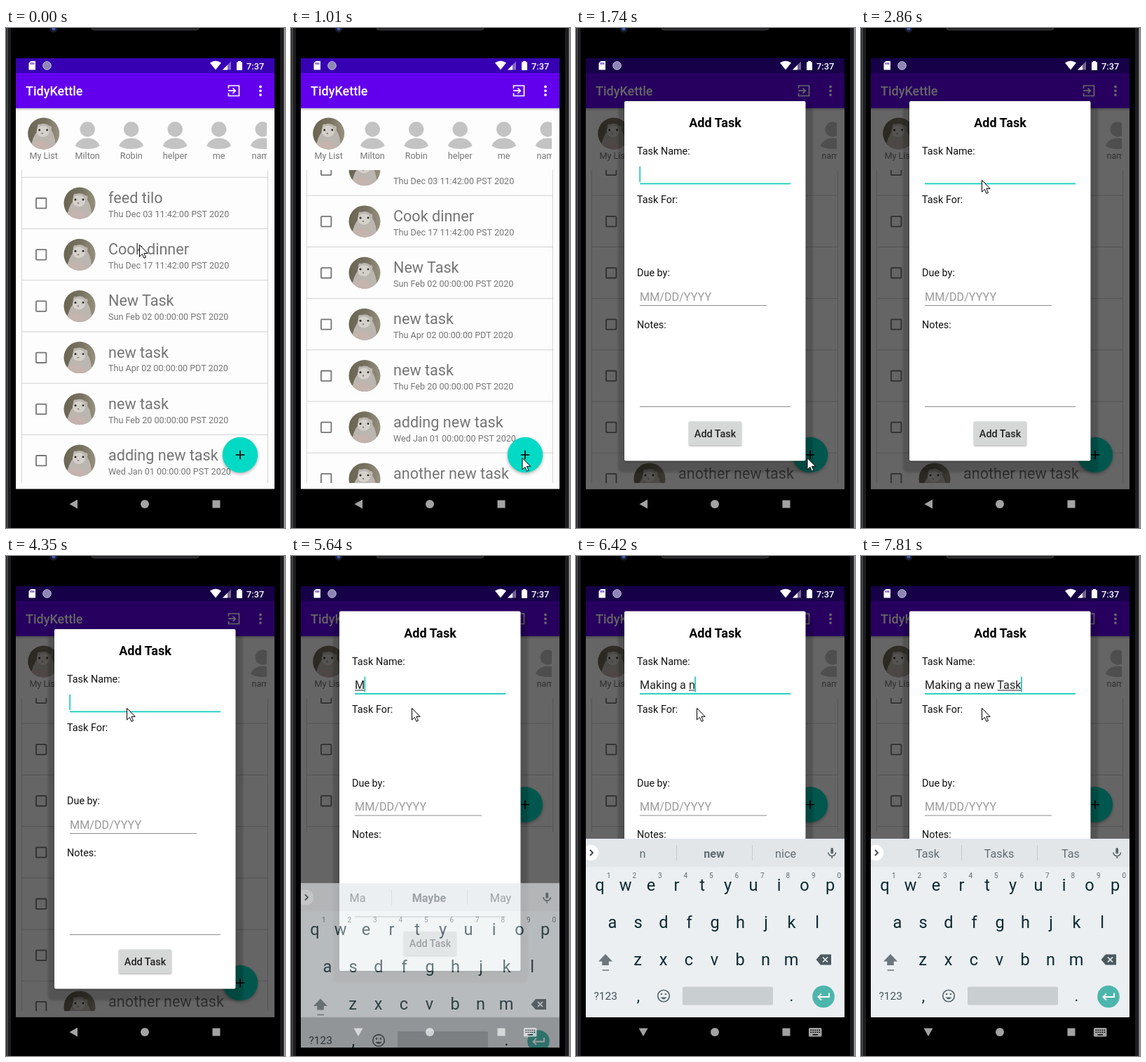
An HTML page that plays this animation: 398x711 px, repeating every 8 s.

```html
<!DOCTYPE html>
<html lang="en">
<head>
<meta charset="utf-8">
<title>Add a task</title>
<style>
  html, body { margin: 0; width: 100%; height: 100%; overflow: hidden; background: #000; }
  svg { display: block; font-family: Roboto, sans-serif; }
  text { white-space: pre; }
  .mid { text-anchor: middle; }
  .medium { font-weight: 500; }
  .bold { font-weight: 700; }
  .shade { filter: blur(1.5px); }
  .fab { filter: drop-shadow(0 2px 2px rgba(0,0,0,.3)); }
  .raised { filter: drop-shadow(0 1px 1px rgba(0,0,0,.35)); }
</style>
</head>
<body>
<svg id="stage" width="398" height="711" viewBox="0 0 398 711">
  <defs>
    <clipPath id="screenClip"><rect x="14" y="43" width="369" height="656"/></clipPath>
    <clipPath id="listClip"><rect id="listArea" x="22" y="202" width="352" height="445"/></clipPath>
    <clipPath id="friendClip"><rect x="23" y="118" width="349" height="84"/></clipPath>
    <clipPath id="round"><circle r="22.5"/></clipPath>
    <linearGradient id="bar" x1="0" y1="0" x2="0" y2="1">
      <stop offset="0" stop-color="#000" stop-opacity=".24"/>
      <stop offset="1" stop-color="#000" stop-opacity="0"/>
    </linearGradient>
    <linearGradient id="wall">
      <stop offset="0" stop-color="#6a6453"/>
      <stop offset=".55" stop-color="#77715f"/>
      <stop offset="1" stop-color="#989280"/>
    </linearGradient>
    <g id="pet" clip-path="url(#round)">
      <rect x="-23" y="-23" width="46" height="46" fill="url(#wall)"/>
      <path d="M-19 23Q-16 4-9-3Q-10-16-5-13Q2-16 8-11Q13-11 11-5Q18 6 17 23Z" fill="#bbb6af"/>
      <ellipse cx="-1" cy="-3" rx="9" ry="8" fill="#d4d1cb"/>
      <path d="M-19 23Q-15 9-4 10Q8 11 10 23Z" fill="#c5b3ae"/>
      <circle cx="-6" cy="-5" r="1.5" fill="#292522"/>
      <circle cx="5" cy="-5" r="1.4" fill="#292522"/>
      <circle cx="-2" cy="0" r="1.2" fill="#96827b"/>
    </g>
    <g id="person" fill="#c3c3c3">
      <circle cy="-6" r="10.7"/>
      <path d="M-17.5 17.5Q-13 6.5 0 6.5Q13 6.5 17.5 17.5Q11 22 0 22Q-11 22-17.5 17.5Z"/>
    </g>
  </defs>

  <!-- phone body -->
  <rect width="398" height="711" fill="#000"/>
  <rect width="7" height="711" fill="#1d1d1f"/>
  <rect x="1" width="1.5" height="711" fill="#55565a"/>
  <rect x="391" width="7" height="711" fill="#1d1d1f"/>
  <rect x="396.5" width="1.5" height="711" fill="#a5a5a8"/>
  <rect x="122" y="-5" width="153" height="8" rx="4" fill="#242426" stroke="#3c3c3e"/>
  <circle cx="68" cy="1" r="5.5" fill="#161a2a"/>
  <circle cx="68" cy="1" r="2.5" fill="#3c59a8"/>

  <!-- app -->
  <rect x="14" y="43" width="369" height="612.5" fill="#fdfdfd"/>
  <g id="friends" clip-path="url(#friendClip)" font-size="12.6" fill="#757575"></g>
  <g clip-path="url(#listClip)">
    <path d="M22.5 200V650M373.5 200V650" stroke="#d5d5d5"/>
    <g id="rows" fill="#757575"></g>
  </g>
  <rect x="14" y="114" width="369" height="4" fill="url(#bar)"/>
  <rect x="14" y="43" width="369" height="21" fill="#3700b3"/>
  <rect x="14" y="64" width="369" height="50" fill="#6200ee"/>
  <text class="medium" x="28" y="96" font-size="18" fill="#fff">TidyKettle</text>
  <path d="M317.5 86V82H332.5V96.5H317.5V92.5M317 89.2H327M323.5 85.5L327.3 89.2L323.5 93" fill="none" stroke="#fff" stroke-width="1.7"/>
  <g fill="#fff"><circle cx="363" cy="83.5" r="1.9"/><circle cx="363" cy="89.3" r="1.9"/><circle cx="363" cy="95.1" r="1.9"/></g>
  <g id="fab">
    <circle class="fab" cx="334" cy="607" r="25.2" fill="#03dac5"/>
    <path d="M327.7 607H340.3M334 600.7V613.3" stroke="#000" stroke-width="1.7"/>
  </g>
  <rect id="dim" x="14" y="43" width="369" height="612.5" opacity="0"/>

  <!-- dialog -->
  <g id="dialog">
    <rect class="shade" x="60" y="112" width="278" height="520" rx="6" opacity=".17"/>
    <rect class="raised" x="69" y="104" width="258.5" height="511.5" rx="2" fill="#fff"/>
    <text class="mid bold" x="198.5" y="141" font-size="18">Add Task</text>
    <g font-size="14.4" fill="#111">
      <text x="87" y="180">Task Name:</text>
      <text x="87" y="248.5">Task For:</text>
      <text x="87" y="353">Due by:</text>
      <text x="87" y="426.5">Notes:</text>
    </g>
    <text id="typed" x="91" y="214.5" font-size="16.2" fill="#222"></text>
    <rect id="wordLine" y="216" height="1" fill="#222"/>
    <rect id="caret" y="197" width="1.8" height="22" fill="#2bc9b9"/>
    <rect x="91" y="220.5" width="215" height="1.8" fill="#14cdbb"/>
    <text x="91" y="387.5" font-size="16.2" fill="#9a9a9a">MM/DD/YYYY</text>
    <path d="M91 394.5H272M91 538.5H306" stroke="#8c8c8c"/>
    <rect class="raised" x="161" y="559.5" width="75" height="34" rx="1.5" fill="#d6d7d7"/>
    <text class="mid medium" x="198.5" y="581.5" font-size="14.4" fill="#222">Add Task</text>
  </g>

  <!-- status icons -->
  <g fill="#fff">
    <path d="M35.5 47H42V59.5H32.5V50Z"/>
    <path d="M35.5 49V52M37.6 49V52M39.7 49V52" stroke="#3700b3"/>
    <circle cx="58.5" cy="53.5" r="5.8" fill="#8d86b5" stroke="#c9c5dc"/>
    <path d="M54 51A6 6 0 0 0 62 58A6 6 0 0 1 54 51Z" fill="#c9c5dc"/>
    <path d="M291 49.5Q299 44 307 49.5L299 59.5Z"/>
    <path d="M309 59.5L321 47.5V59.5Z" opacity=".4"/>
    <path d="M309 59.5L316 52.5V59.5Z"/>
    <path d="M329 48.5H331V47H335V48.5H337V60H329Z"/>
    <text class="medium" x="343" y="58.5" font-size="12.8">7:37</text>
  </g>

  <!-- keyboard -->
  <g clip-path="url(#screenClip)">
    <g id="keyboard">
      <rect x="14" y="402" width="369" height="254" fill="#ebeff2"/>
      <rect x="14" y="402" width="369" height="40" fill="#e2e6e9"/>
      <circle cx="21" cy="422" r="11.2" fill="#fff"/>
      <path d="M20 418L24 422L20 426" fill="none" stroke="#37474f" stroke-width="1.8"/>
      <path d="M143.5 411V433M251.5 411V433" stroke="#c5cbcf"/>
      <g id="hints" font-size="16.2" fill="#616c72"></g>
      <g fill="none" stroke="#59666c" stroke-width="1.6">
        <path d="M360 421.5A5.2 5.2 0 0 0 370.4 421.5M365.2 426.5V430"/>
        <rect x="363.3" y="415" width="3.8" height="8.5" rx="1.9" fill="#59666c" stroke="none"/>
      </g>
      <g id="keys" font-size="23.6" fill="#0c2a32"></g>
      <path id="shift" d="M42 566L52 576.5H46.8V582H37.2V576.5H32Z" fill="#6b777d"/>
      <path d="M37.5 589H47" stroke="#6b777d" stroke-width="1.5"/>
      <path d="M349 566.5H364V581.5H349L342.5 574Z" fill="#4b5960"/>
      <path d="M352 570.5L359 577.5M359 570.5L352 577.5" stroke="#ebeff2" stroke-width="1.7"/>
      <text x="25.5" y="631" font-size="15.5" fill="#45545b">?123</text>
      <text class="mid" x="89" y="633" font-size="22" fill="#0c2a32">,</text>
      <text class="mid" x="307.5" y="633" font-size="22" fill="#0c2a32">.</text>
      <g fill="none" stroke="#55636a" stroke-width="1.6">
        <circle cx="125" cy="625.5" r="8.3"/><path d="M120.5 627.5Q125 633 129.5 627.5Z" fill="#55636a" stroke="none"/>
        <path d="M121 623H123.2M126.8 623H129" stroke-width="2.2"/>
      </g>
      <rect x="152" y="612.5" width="129" height="26" rx="2" fill="#c9ced1"/>
      <circle cx="353" cy="626.5" r="15.8" fill="#4db6ac"/>
      <path d="M361 621.5V627H346M350 622.5L345.5 627L350 631.5" fill="none" stroke="#fff" stroke-width="1.9"/>
    </g>
  </g>

  <!-- navigation bar -->
  <g fill="#fff" opacity=".64">
    <path id="back"/>
    <circle cx="198" cy="677" r="6"/>
    <rect x="294.5" y="671.5" width="11" height="11"/>
    <g id="imeIcon">
      <rect x="332" y="671" width="18.5" height="12.5" rx="1.5"/>
      <path d="M334.5 674.3H348.5M334.5 677.2H348.5" stroke="#000" stroke-width="1.5" stroke-dasharray="1.7 1.3"/>
      <path d="M337.5 680.7H345" stroke="#000" stroke-width="1.5"/>
    </g>
  </g>
  <path id="pointer" d="M0 0V16.5L3.9 12.9L6.5 18.7L9 17.6L6.4 11.9H11.7Z" fill="#fff" stroke="#000"/>
</svg>
<script>
const LOOP = 8000;
const $ = id => document.getElementById(id);
const label = (x, y, str, extra = '') => `<text x="${x}" y="${y}" ${extra}>${str}</text>`;

const friends = ['My List', 'Milton', 'Robin', 'helper', 'me', 'name'];
$('friends').innerHTML = friends.map((name, i) => {
  const x = 53.7 + i * 62.5;
  return `<use href="#${i ? 'person' : 'pet'}" x="${x}" y="150"/>` + label(x, 186, name, 'class="mid"');
}).join('');

const tasks = [
  ['feed tilo', 'Thu Dec 03 11:42:00 PST 2020'],
  ['Cook dinner', 'Thu Dec 17 11:42:00 PST 2020'],
  ['New Task', 'Sun Feb 02 00:00:00 PST 2020'],
  ['new task', 'Thu Apr 02 00:00:00 PDT 2020'],
  ['new task', 'Thu Feb 20 00:00:00 PST 2020'],
  ['adding new task', 'Wed Jan 01 00:00:00 PST 2020'],
  ['another new task', 'Wed Jan 01 00:00:00 PST 2020']
];
$('rows').innerHTML = tasks.map(([name, due], i) => `
  <g transform="translate(0 ${212.5 + i * 73.2})">
    <path d="M22 0H374" stroke="#d2d2d2"/>
    <rect x="43" y="29.7" width="14.4" height="14.4" rx="1" fill="none" stroke="#757575" stroke-width="1.8"/>
    <use href="#pet" x="105" y="36.7"/>
    ${label(146, 36.7, name, 'font-size="21.6"')}
    ${label(146, 56.5, due, 'font-size="12.6"')}
  </g>`).join('');

const keyRows = [['qwertyuiop', 34, 476], ['asdfghjkl', 52, 528.5], ['zxcvbnm', 88, 581.5]];
$('keys').innerHTML = keyRows.map(([letters, x, y], row) => [...letters].map((ch, i) => {
  const cx = x + i * 36.5;
  const digit = row ? '' : label(cx + 12.8, 458, (i + 1) % 10, 'class="mid" font-size="10" fill="#5d6a70"');
  return label(cx, y, ch, 'class="mid key"') + digit;
}).join('')).join('');
const keys = [...document.querySelectorAll('.key')];
const letters = keys.map(k => k.textContent);

$('hints').innerHTML = [95, 197, 299].map(x => label(x, 428.5, '', 'class="mid"')).join('');
const hints = [...$('hints').children];

// time, text, start of the underlined word (-1: none), suggestions, bold suggestion
const typing = [
  [0, '', -1, ['', '', ''], -1],
  [5590, 'M', 0, ['Ma', 'Maybe', 'May'], 1],
  [5700, 'Ma', 0, ['Ma', 'May', 'Maybe'], 1],
  [5780, 'Mak', 0, ['Mak', 'Make', 'Making'], 1],
  [5860, 'Maki', 0, ['Maki', 'Making', 'Makin'], 1],
  [5940, 'Makin', 0, ['Makin', 'Making', 'Makings'], 1],
  [6020, 'Making', 0, ['Making', 'Makings', 'Makin'], -1],
  [6090, 'Making ', -1, ['a', 'the', 'it'], -1],
  [6170, 'Making a', 7, ['a', 'an', 'all'], -1],
  [6240, 'Making a ', -1, ['new', 'good', 'few'], -1],
  [6420, 'Making a n', 9, ['n', 'new', 'nice'], 1],
  [6480, 'Making a ne', 9, ['ne', 'new', 'need'], 1],
  [6660, 'Making a new', 9, ['new', 'news', 'newer'], -1],
  [6780, 'Making a new ', -1, ['one', 'account', 'year'], -1],
  [7170, 'Making a new T', 13, ['T', 'The', 'To'], 1],
  [7260, 'Making a new Ta', 13, ['Ta', 'Take', 'Talk'], 1],
  [7440, 'Making a new Tas', 13, ['Tas', 'Task', 'Taste'], 1],
  [7810, 'Making a new Task', 13, ['Task', 'Tasks', 'Tas'], -1]
];

const pen = document.createElement('canvas').getContext('2d');
const widthOf = str => { pen.font = '16.2px Roboto, sans-serif'; return pen.measureText(str).width; };

const linear = u => u;
const smooth = u => u * u * (3 - 2 * u);
const settle = u => 1 - (1 - u) ** 2;
function track(t, stops, ease = linear) {
  const next = stops.findIndex(s => s[0] > t);
  if (next === 0) return stops[0][1];
  if (next < 0) return stops[stops.length - 1][1];
  const [t0, a] = stops[next - 1], [t1, b] = stops[next];
  return a + (b - a) * ease((t - t0) / (t1 - t0));
}
const show = (id, on) => $(id).setAttribute('visibility', on ? 'visible' : 'hidden');
const move = (id, x, y) => $(id).setAttribute('transform', `translate(${x} ${y})`);

// the list coasts to rest while the pointer heads for the round button
const scroll = [[0, 0], [520, -47.5]];
const pointerX = [[120, 190.5], [760, 323], [870, 323], [1010, 330], [2180, 330], [2810, 172.5]];
const pointerY = [[120, 308.5], [760, 611.5], [2180, 611.5], [2810, 216.5]];
const popUp = [[1480, 0], [1740, 1]];
const slide = [[5570, 150], [5640, 64], [5720, 18], [5790, 0]];
const fade = [[5570, 0], [5640, .62], [5720, .9], [5790, 1]];
const blinkTimes = [1920, 2370, 2860, 3360, 3860, 4350, 4850, 5340];

function draw(t) {
  const raised = t >= 5590;
  move('pointer', track(t, pointerX, smooth), track(t, pointerY, smooth));
  move('rows', 0, track(t, scroll, settle));
  $('listArea').setAttribute('height', raised ? 190.5 : 445);
  move('fab', 0, raised ? -253.5 : 0);

  const pop = track(t, popUp, settle);
  $('dim').setAttribute('opacity', .6 * pop);
  const size = .9 + .1 * pop;
  $('dialog').setAttribute('opacity', pop);
  $('dialog').setAttribute('transform',
    `translate(${198 * (1 - size)} ${360 * (1 - size) - (raised ? 25.5 : 0)}) scale(${size})`);

  const [, str, from, words, strong] = typing.filter(s => s[0] <= t).pop();
  const end = 91 + widthOf(str);
  $('typed').textContent = str;
  $('caret').setAttribute('x', end - .7);
  show('caret', blinkTimes.filter(b => b <= t).length % 2 === 0);
  const start = from < 0 ? end : 91 + widthOf(str.slice(0, from));
  $('wordLine').setAttribute('x', start);
  $('wordLine').setAttribute('width', end - start);

  hints.forEach((h, i) => {
    h.textContent = words[i];
    h.setAttribute('class', i === strong ? 'mid bold' : 'mid');
  });
  const caps = t >= 7080 && t < 7170;
  keys.forEach((k, i) => k.textContent = caps ? letters[i].toUpperCase() : letters[i]);
  $('shift').setAttribute('fill', caps ? '#009688' : '#6b777d');
  move('keyboard', 0, track(t, slide));
  $('keyboard').setAttribute('opacity', track(t, fade));

  const ime = t >= 5340;
  show('imeIcon', ime);
  $('back').setAttribute('d', ime ? 'M89.5 671.5H102.5L96 683Z' : 'M90.5 677L102 670.5V683.5Z');
}

const begin = performance.now();
function tick() {
  draw((performance.now() - begin) % LOOP);
  requestAnimationFrame(tick);
}
tick();
</script>
</body>
</html>
```
